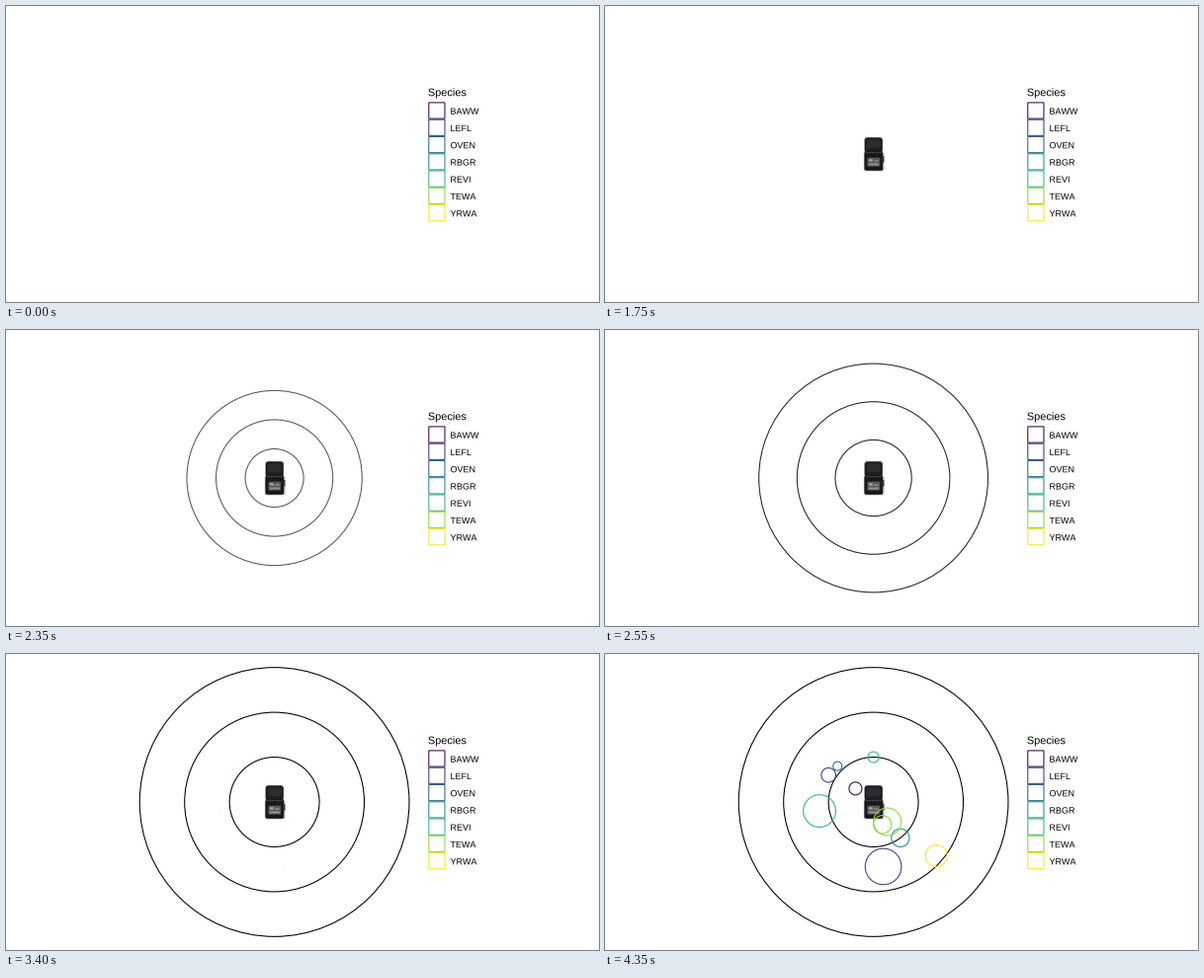
These frames come from a looping animation (600 px wide and 300 px high, 5000 ms). A matplotlib script:

```python
import matplotlib.pyplot as plt
from matplotlib.animation import FuncAnimation
from matplotlib.patches import Circle, FancyBboxPatch, PathPatch, Rectangle
from matplotlib.textpath import TextPath
from matplotlib.transforms import Affine2D

W, H, DPI = 600, 300, 100
PX = 72 / DPI                 # one pixel in points
FRAMES, STEP = 100, 50
GROW = 20                     # frames each entrance takes
RINGS_AT, BIRDS_AT = 34, 67
CX, CY, UNIT = 271.6, 150, 45.45
LINE = 1.07 * PX

plt.rcParams["font.family"] = "Liberation Sans"
plt.rcParams["text.kerning_factor"] = 6   # no pair kerning

COLORS = {
    "BAWW": "#440154", "LEFL": "#443A83", "OVEN": "#31688E",
    "RBGR": "#21908C", "REVI": "#35B779", "TEWA": "#8FD744",
    "YRWA": "#FDE725",
}

# species, x and y in ring units, final radius in pixels
BIRDS = [
    ("BAWW", -0.4, 0.3, 6.5),
    ("LEFL", -1.0, 0.6, 7.3),
    ("LEFL", 0.22, -1.44, 18.3),
    ("OVEN", -0.8, 0.8, 4.5),
    ("RBGR", 0.6, -0.8, 9.1),
    ("REVI", 0.0, 1.0, 5.5),
    ("REVI", -1.2, -0.2, 16.4),
    ("TEWA", 0.31, -0.44, 14.0),
    ("TEWA", 0.2, -0.5, 9.1),
    ("YRWA", 1.4, -1.2, 11.0),
]

fig = plt.figure(figsize=(W / DPI, H / DPI), dpi=DPI, facecolor="white")
ax = fig.add_axes([0, 0, 1, 1])
ax.set_xlim(0, W)
ax.set_ylim(H, 0)
ax.axis("off")


def label(x, y, text, size):
    """Text as outlines, so it can sit between whole pixels."""
    flip = Affine2D().scale(1, -1).translate(x, y)
    path = TextPath((0, 0), text, size=size).transformed(flip)
    ax.add_patch(PathPatch(path, fc="black", lw=0, snap=False))


def box(x0, y0, x1, y1, color, r=0.0):
    if r:
        patch = FancyBboxPatch((x0 + r, y0 + r), x1 - x0 - 2 * r, y1 - y0 - 2 * r,
                               boxstyle=f"round,pad={r}", fc=color, lw=0, snap=False)
    else:
        patch = Rectangle((x0, y0), x1 - x0, y1 - y0, fc=color, lw=0, snap=False)
    return ax.add_patch(patch)


def outline(x, y, color, order):
    return ax.add_patch(Circle((x, y), 0, fill=False, ec=color, lw=LINE, zorder=order))


def draw_legend():
    label(426.8, 91.2, "Species", 11)
    pitch, side = 17.28, 16.2
    for i, (name, color) in enumerate(COLORS.items()):
        y = 106.0 + i * pitch
        ax.add_patch(Rectangle((435.9 - side / 2, y - side / 2), side, side,
                               fill=False, ec=color, lw=LINE,
                               joinstyle="miter", snap=False))
        label(449.5, y + 3.7, name, 9)


def draw_recorder():
    return [
        box(261.8, 148, 282.6, 167.6, "#c8c8c8", 2),
        box(262.4, 133, 281, 149, "#5a5a5c", 3),
        box(263, 133.8, 280.4, 149, "#1f1f21", 2.5),
        box(265, 135.5, 278.5, 144, "#2c2c2e", 2),
        box(262.4, 147.5, 281.2, 166.8, "#18181a", 2),
        box(264, 148.2, 279.6, 149.2, "#48484a"),
        box(280.6, 152, 282.4, 158.5, "#3a3a3c"),
        box(265.4, 153.6, 278.2, 162.6, "#57595b", 0.8),
        box(267, 155.2, 270.8, 157.6, "#a2a6a8"),
        box(272, 156, 276.6, 158, "#7b7f81"),
        box(266.6, 159.6, 276.8, 161.4, "#93979a"),
    ]


draw_legend()
recorder = draw_recorder()
rings = [(outline(CX, CY, "black", 2), n * UNIT) for n in (1, 2, 3)]
birds = [(outline(CX + x * UNIT, CY - y * UNIT, COLORS[name], 3), r)
         for name, x, y, r in BIRDS]


def grow(circles, frame, start):
    p = min(max((frame - start) / GROW, 0), 1)
    for circle, radius in circles:
        circle.set_radius(radius * p)
        circle.set_alpha(p)
        circle.set_visible(p > 0)


def update(frame):
    for part in recorder:
        part.set_visible(frame > 0)
    grow(rings, frame, RINGS_AT)
    grow(birds, frame, BIRDS_AT)
    return []


def reset():
    return update(0)


anim = FuncAnimation(fig, update, frames=FRAMES, init_func=reset,
                     interval=STEP, repeat=True, repeat_delay=0, blit=False)
plt.show()
```
